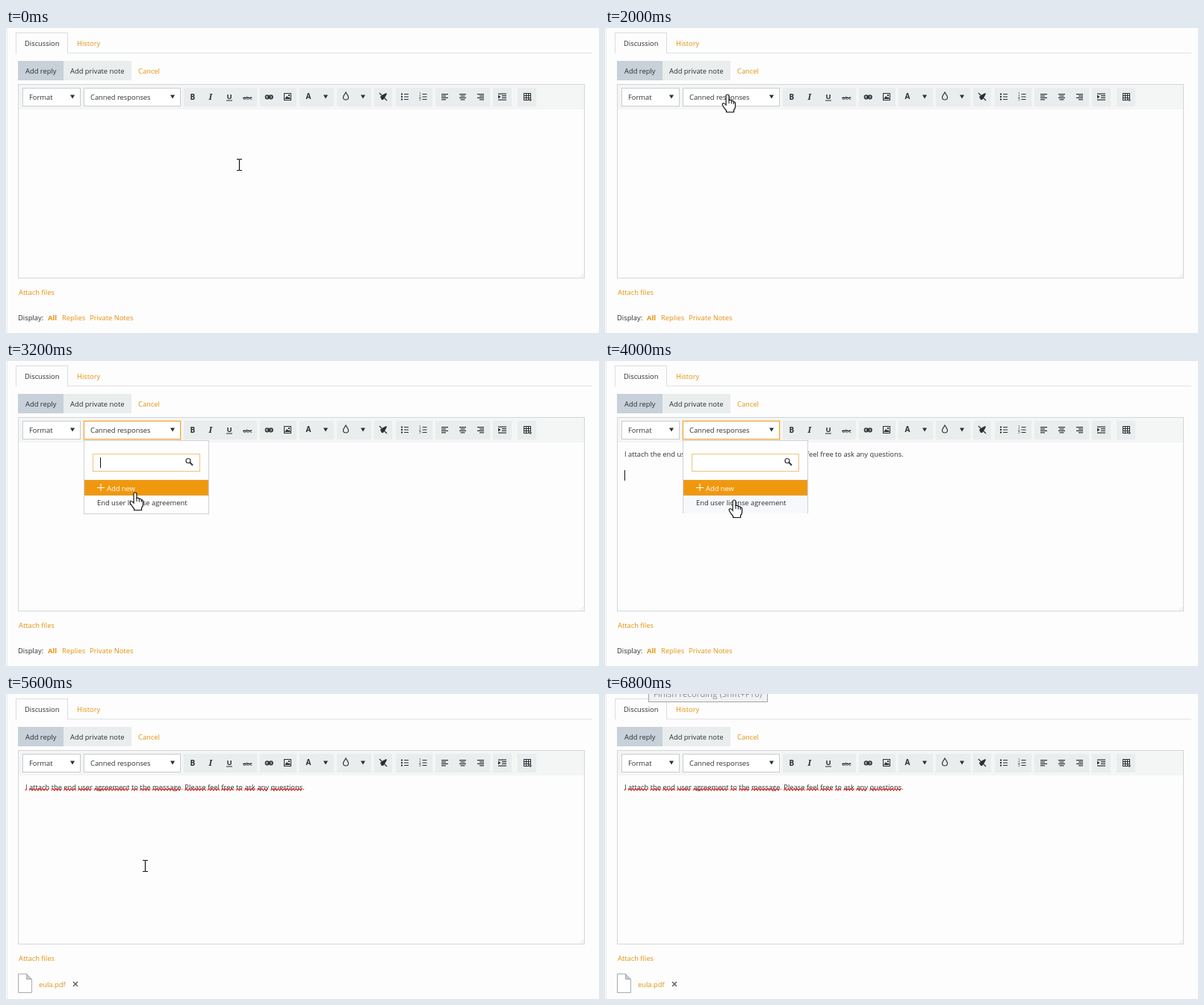
These frames come from a looping animation (794 by 408 pixels, 7 s). An HTML page with a canvas:

```html
<!DOCTYPE html>
<html lang="en">
<head>
<meta charset="utf-8">
<title>Canned response</title>
<style>
html, body { margin: 0; width: 100%; height: 100%; overflow: hidden; background: #fdfdfd; }
canvas { display: block; }
</style>
</head>
<body>
<canvas id="stage" width="794" height="408"></canvas>
<script>
const c = document.getElementById('stage').getContext('2d');
const LOOP = 7000, STEP = 200;
const FONT = '"Open Sans", "Noto Sans", sans-serif';
const INK = '#2b2f33', ORANGE = '#e3920f', PAPER = '#fdfdfd', PANEL = '#e9eded', EDGE = '#d3d7d9';
const MESSAGE = 'I attach the end user agreement to the message. Please feel free to ask any questions.';

const OPEN = 2200, PICK = 4000, CLOSE = 4200, SPELL = 4400, TIP = 6800;
const searchCaret = [[2200, 2800], [3200, 3800]];
const bodyCaret = [[4000, 4600], [5000, 5600], [6000, 6600]];

// Pointer stops: time, x, y
const route = [
  [0, 312, 183], [1400, 136, 92], [2200, 169, 89], [2400, 169, 89],
  [3400, 173, 186], [4000, 173, 186], [4600, 293, 267],
  [4800, 186, 230], [5600, 186, 230], [6200, 138, -30], [LOOP, 138, -30]
];

const within = (t, spans) => spans.some(([a, b]) => t >= a && t < b);

function pointerAt(t) {
  const i = route.findIndex(p => p[0] > t);
  const [t0, x0, y0] = route[i - 1], [t1, x1, y1] = route[i];
  const u = (t - t0) / (t1 - t0), k = u * u * (3 - 2 * u);
  return [x0 + (x1 - x0) * k, y0 + (y1 - y0) * k].map(Math.round);
}

function rect(x, y, w, h, color) {
  c.fillStyle = color;
  c.fillRect(x, y, w, h);
}

function box(x, y, w, h, fill, edge) {
  rect(x, y, w, h, edge);
  rect(x + 1, y + 1, w - 2, h - 2, fill);
}

function text(s, x, y, color = INK, style = '', size = 9.35) {
  c.font = `${style} ${size}px ${FONT}`;
  c.fillStyle = color;
  c.fillText(s, x, y);
}

function line(points, color = INK, width = 1) {
  c.beginPath();
  points.forEach(([x, y]) => c.lineTo(x, y));
  c.strokeStyle = color;
  c.lineWidth = width;
  c.stroke();
}

function shape(path, x, y, fill, stroke, width = 1) {
  c.save();
  c.translate(x, y);
  const p = new Path2D(path);
  if (fill) { c.fillStyle = fill; c.fill(p); }
  if (stroke) { c.strokeStyle = stroke; c.lineWidth = width; c.stroke(p); }
  c.restore();
}

const arrow = (x, y = 92) => shape('M-3 -2.5H3L0 2.5Z', x, y, INK);

function bars(x, widths, align) {
  widths.forEach((w, i) => rect(x + (9 - w) * align, 88 + i * 2.4, w, 1.2, INK));
}

function select(label, x, w, focused) {
  if (focused) {
    rect(x - 1, 79, w + 2, 28, '#fbe3b7');
    box(x, 80, w, 25, '#fff', '#eda63a');
  } else box(x, 80, w, 25, '#fff', '#c9cdd0');
  text(label, x + 9, 96, '#333');
  arrow(x + w - 11);
}

function letters() {
  text('B', 246.5, 96, INK, 'bold', 10);
  c.font = 'italic bold 11px "Noto Serif", serif';
  c.fillText('I', 271.5, 96);
  text('U', 295.5, 95, INK, 'bold', 9.5);
  rect(295, 96.5, 8, 1, INK);
  text('abc', 317.5, 96, INK, '', 7.5);
  rect(317, 93, 12, 1, INK);
  text('A', 401.5, 95, INK, 'bold', 10);
}

function icons() {
  c.strokeStyle = INK;
  c.lineWidth = 1.6;
  for (const x of [347.5, 352.5]) {
    c.beginPath();
    c.roundRect(x, 90, 4.5, 4.6, 2.2);
    c.stroke();
  }
  rect(349.5, 91.6, 6, 1.4, INK);

  box(372, 87, 10, 10, PANEL, INK);
  shape('M1 8L4 4L6 6L7.5 5L9 8Z', 372, 87, INK);
  rect(378, 89, 2, 2, INK);

  arrow(428);
  shape('M0 -5C1.5 -2 3.5 -.5 3.5 1.8A3.5 3.2 0 0 1 -3.5 1.8C-3.5 -.5 -1.5 -2 0 -5Z', 455, 91, null, INK, 1.1);
  arrow(478);

  shape('M-4 0L0 -3L4 -5L5 -4L3 0L0 4L-2 4Z', 505, 92, INK);
  line([[500, 87], [510, 97]], INK, 1.3);

  for (let i = 0; i < 3; i++) {
    const y = 88 + i * 3.5;
    rect(529, y - .5, 2, 2, INK);
    rect(533, y, 6, 1, INK);
    rect(557.5, y, 6, 1, INK);
    text(String(i + 1), 553, y + 2.2, INK, '', 4.5);
  }

  bars(583, [9, 6, 9, 6], 0);
  bars(607, [9, 6, 9, 6], .5);
  bars(631, [9, 6, 9, 6], 1);

  rect(659, 87.5, 11, 1.2, INK);
  rect(659, 95.5, 11, 1.2, INK);
  rect(664, 90, 6, 1.2, INK);
  rect(664, 92.7, 6, 1.2, INK);
  shape('M0 0L3.5 2.5L0 5Z', 659, 89.6, INK);

  for (let i = 0; i < 4; i++) {
    rect(693, 87 + i * 3, 10, 1, INK);
    rect(693 + i * 3, 87, 1, 10, INK);
  }
  rect(700, 94, 4, 4, PANEL);
  rect(700, 95.5, 4, 1, INK);
  rect(701.5, 94, 1, 4, INK);
}

function page(t) {
  rect(0, 0, 794, 408, PAPER);
  rect(1, 0, 1, 408, '#e9e9e9');

  rect(13, 33, 772, 1, '#dfe2e3');
  box(13, 6, 70, 29, PAPER, '#dadddf');
  rect(14, 33, 68, 2, PAPER);
  rect(13, 34, 1, 1, PAPER);
  rect(82, 34, 1, 1, PAPER);
  text('Discussion', 25, 24);
  text('History', 95, 24, ORANGE);

  rect(16, 44, 61, 26, '#c8d1d9');
  rect(77, 44, 91, 26, PANEL);
  text('Add reply', 26, 61);
  text('Add private note', 86, 61);
  text('Cancel', 177, 61, ORANGE);

  box(16, 75, 759, 260, PAPER, EDGE);
  rect(17, 76, 757, 33, '#f4f5f5');
  line([[769, 333.5], [774, 328.5]], '#dde0e1');
  line([[772, 333.5], [774, 331.5]], '#dde0e1');

  select('Format', 22, 78, false);
  select('Canned responses', 104, 130, t >= OPEN && t < CLOSE);
  [[238, 98], [340, 49], [393, 46], [443, 46], [493, 24], [522, 49], [575, 73], [652, 25], [685, 25]]
    .forEach(([x, w]) => rect(x, 80, w, 25, PANEL));
  letters();
  icons();
}

function squiggles() {
  let start = 0;
  for (const word of MESSAGE.split(' ')) {
    c.font = ` 9.35px ${FONT}`;
    const x = 26 + c.measureText(MESSAGE.slice(0, start)).width;
    const w = c.measureText(word.replace('.', '')).width;
    const wave = [];
    for (let d = 0; d <= w; d += 2) wave.push([x + d, d % 4 ? 126.6 : 129]);
    if (wave.length < 2) wave.push([x + w, 126.6]);
    line(wave, '#d8322e', 1.2);
    start += word.length + 1;
  }
}

function message(t) {
  if (t < PICK) return;
  text(MESSAGE, 26, 127.5, '#2f3133');
  if (t >= SPELL) squiggles();
  if (within(t, bodyCaret)) rect(26, 146, 1, 14, '#111');
}

function footer(t) {
  text('Attach files', 17, 357, ORANGE);
  if (t < CLOSE) {
    text('Display:', 16, 391);
    text('All', 56, 391, ORANGE, 'bold');
    text('Replies', 75, 391, ORANGE);
    text('Private Notes', 112, 391, ORANGE);
    return;
  }
  shape('M.5 .5H11.5L18.5 7.5V25.5H.5Z', 16, 374, '#fff', '#a9adb0');
  shape('M11.5 .5V7.5H18.5Z', 16, 374, '#c9cccf', '#a9adb0');
  text('eula.pdf', 44, 392, ORANGE);
  line([[90, 385], [96, 391]], '#666', 1.6);
  line([[96, 385], [90, 391]], '#666', 1.6);
}

function menu(t, y) {
  if (t < OPEN || t >= CLOSE) return;
  box(104, 106, 168, 99, '#fefefe', '#cfd2d4');
  if (t >= PICK) rect(104, 204, 168, 1, PAPER);
  box(116, 124, 144, 24, '#fff', '#ecc57c');
  if (within(t, searchCaret)) rect(126, 129, 1, 14, '#111');
  c.beginPath();
  c.arc(244, 133.5, 3, 0, 7);
  c.strokeStyle = INK;
  c.lineWidth = 1.2;
  c.stroke();
  line([[246, 135.5], [250, 139.5]], INK, 1.8);

  box(105, 159, 166, 21, '#f0980d', '#e2a03c');
  rect(122, 169, 10, 1, '#fff');
  rect(126.5, 164, 1, 10, '#fff');
  text('Add new', 135, 174, '#fff');
  if (y > 180) rect(105, 180, 166, 24, '#f7f8fc');
  text('End user license agreement', 122, 193);
}

function tooltip(t) {
  if (t < TIP) return;
  box(58, -12, 160, 23, '#f0f1f4', '#a3a5a9');
  text('Finish recording (Shift+F10)', 65, 3.5, '#888b90', '', 11.5);
}

const HAND = 'M-2 12V1.5Q-2 0 0 0Q2 0 2 1.5V7.5Q5 6.5 5.3 8.5Q8 7.7 8.2 10Q10.5 9.5 10.5 12V16Q10.5 19 8.5 20.5V23.5H-1.5V21.5Q-4 19 -6.5 14.5Q-7.5 12 -5.5 11.5Q-4 11.5 -2 14Z';
const FINGERS = 'M2 7V12M5.3 8.5V12.5M8.2 10V13';
const POINTER = 'M0 0V16L3.8 12.5L6.2 18L8.6 17L6.3 11.6H11.3Z';
const BEAM = 'M-3.5 -7.5H-1L0 -6.8L1 -7.5H3.5M0 -6.8V6.8M-3.5 7.5H-1L0 6.8L1 7.5H3.5';

function cursor(t, x, y) {
  const inMenu = t >= OPEN && t < CLOSE && x > 104 && x < 272 && y < 205;
  const onSelect = y > 79 && y < 106 && x > 104 && x < 234;
  if (onSelect || (inMenu && y > 159)) {
    shape(HAND, x, y, '#fff', '#111', 1.2);
    shape(FINGERS, x, y, null, '#111');
  } else if (y > 109 && y < 334 || inMenu && y > 124 && y < 148) {
    shape(BEAM, x + .5, y, null, '#111', 1.2);
  } else shape(POINTER, x, y, '#fff', '#111');
}

function draw(now) {
  const t = Math.floor(now % LOOP / STEP) * STEP;
  const [x, y] = pointerAt(t);
  page(t);
  message(t);
  footer(t);
  menu(t, y);
  tooltip(t);
  cursor(t, x, y);
}

let begin;
function tick(now) {
  begin ??= now;
  draw(Math.max(0, now - begin));
  requestAnimationFrame(tick);
}
draw(0);
requestAnimationFrame(tick);
</script>
</body>
</html>
```
